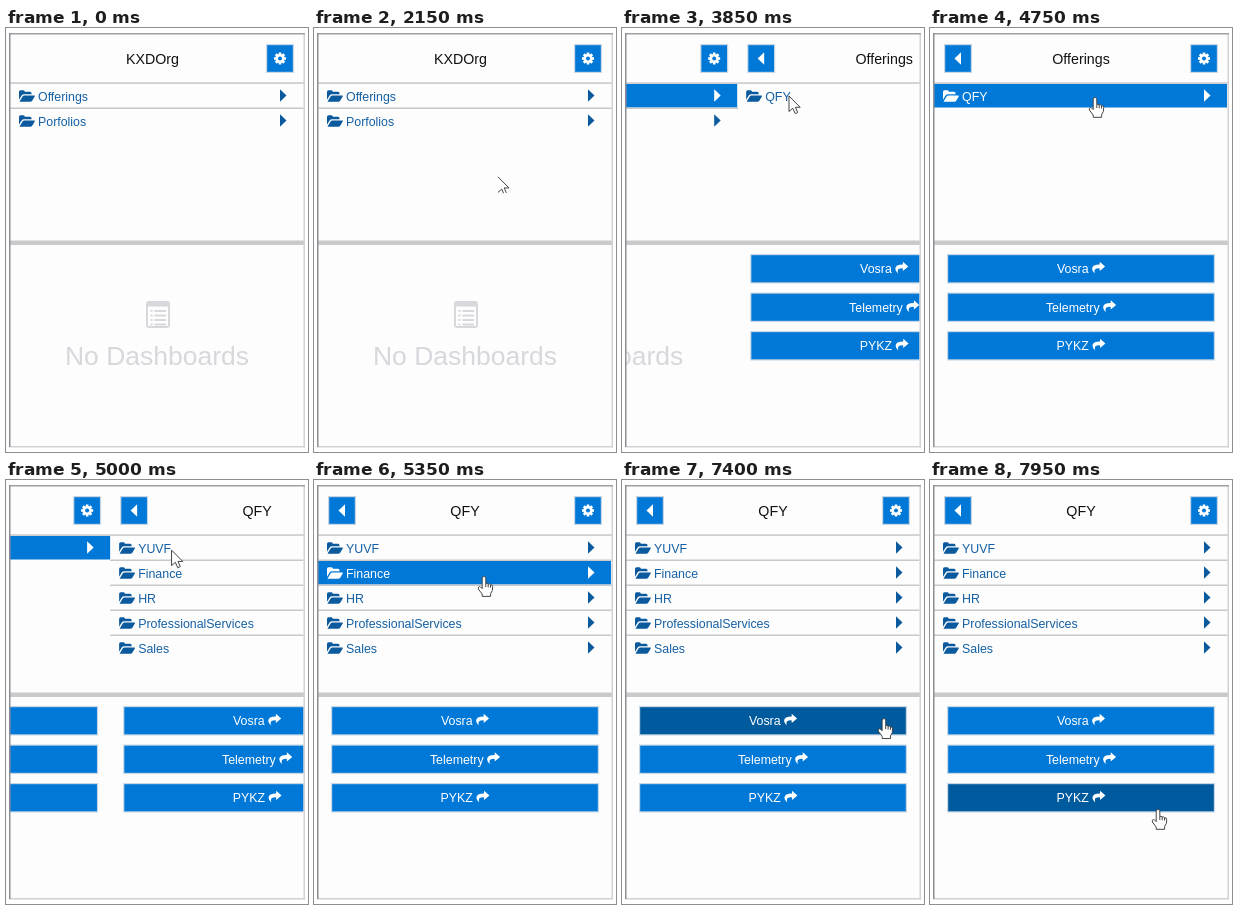
Write an HTML page with a canvas that moves like this. It is 302 px wide and 424 px high and loops after 8 s.

```html
<!DOCTYPE html>
<html lang="en">
<head>
<meta charset="utf-8">
<title>Dashboard navigator</title>
<style>
html, body { margin: 0; width: 100%; height: 100%; overflow: hidden; background: #fff; }
canvas { display: block; width: 302px; height: 424px; }
</style>
</head>
<body>
<canvas id="stage"></canvas>
<script>
const W = 302, H = 424, LOOP = 8000, PAGE_W = 293;
const BLUE = '#0078d7', DARK = '#005a9e', LINK = '#1560a3', RULE = '#c8c8ca', GHOST = '#d7d8dc';
const FONT = '"Liberation Sans", Arial, sans-serif';

const canvas = document.getElementById('stage');
const ctx = canvas.getContext('2d');
const dpr = window.devicePixelRatio || 1;
canvas.width = W * dpr;
canvas.height = H * dpr;

const tools = ['Vosra', 'Telemetry', 'PYKZ'];
const pages = [
  { title: 'KXDOrg', rows: ['Offerings', 'Porfolios'], tools: [] },
  { title: 'Offerings', rows: ['QFY'], tools, back: true },
  { title: 'QFY', rows: ['YUVF', 'Finance', 'HR', 'ProfessionalServices', 'Sales'], tools, back: true }
];

const slides = [3620, 4760];
const SLIDE_MS = 400;

// time, x, y of the pointer tip
const path = [
  [1750, 290, 300], [2150, 184, 149], [2550, 176, 112], [2700, 171, 92], [2900, 167, 69],
  [3850, 167, 68], [4300, 165, 69], [4750, 165, 69], [5200, 166, 71], [5320, 170, 96],
  [5700, 170, 97], [5950, 168, 114], [6300, 161, 184], [6520, 215, 290], [6800, 258, 216],
  [7100, 290, 236], [7250, 304, 238], [7400, 262, 238], [7800, 228, 329], [8000, 228, 329]
];

const folder = new Path2D('M0 9.5V1.5Q0 0 1.5 0H4.5Q5.8 0 5.8 1.5H11Q12.5 1.5 12.5 3V4H5Q3.5 4 2.6 5.3Z' +
  'M.6 11.3L3.6 6.2Q4.2 5.1 5.4 5.1H15.2Q16.4 5.1 15.7 6.3L13.2 10.4Q12.4 11.5 11.2 11.5H1Q.4 11.5 .6 11.3Z');
const share = new Path2D('M7.6 0L13 4.6L7.6 9.2V6.6Q2.4 6.3 2.4 9.4Q2.4 10.6 3 12Q0 9.6 0 7Q0 2.6 7.6 2.6Z');
const arrow = new Path2D('M0 0V15.5L3.8 12.2L6.2 17.6L8.7 16.5L6.4 11.3H11.2Z');
const faintArrow = new Path2D('M0 0L11 11H6.2L8.4 16M0 15.5L3.8 12.2L5.6 16.4');
const hand = new Path2D('M-1.8 1.5Q0 -1 1.8 1.5V7.5Q3.2 6.6 4.2 8Q5.6 7.3 6.5 8.8Q8.7 8.3 8.7 10.5' +
  'Q9 15 6.6 17.5V20.3H-1.8V18L-5.6 13Q-6 9.8 -3.6 10.8L-1.8 12.6Z');
const fingers = new Path2D('M1.8 7.5V11M4.2 8V11.3M6.5 8.8V11.6');

function text(str, x, y, size, color, align = 'left') {
  ctx.font = `${size}px ${FONT}`;
  ctx.textAlign = align;
  ctx.fillStyle = color;
  ctx.fillText(str, x, y);
}

function rect(x, y, w, h, color) {
  ctx.fillStyle = color;
  ctx.fillRect(x, y, w, h);
}

function fillAt(shape, x, y, color) {
  ctx.save();
  ctx.translate(x, y);
  ctx.fillStyle = color;
  ctx.fill(shape);
  ctx.restore();
}

function triangle(x, y, dx, half, color) {
  ctx.fillStyle = color;
  ctx.beginPath();
  ctx.moveTo(x, y - half);
  ctx.lineTo(x + dx, y);
  ctx.lineTo(x, y + half);
  ctx.fill();
}

function disc(x, y, r, color) {
  ctx.fillStyle = color;
  ctx.beginPath();
  ctx.arc(x, y, r, 0, Math.PI * 2);
  ctx.fill();
}

function button(x, y, w, h, color = BLUE) {
  rect(x, y, w, h, '#c6d6e4');
  rect(x + 1.2, y + 1.2, w - 2.4, h - 2.4, color);
}

function gear(x, y) {
  ctx.save();
  ctx.translate(x, y);
  for (let i = 0; i < 4; i++) {
    rect(-1.3, -6, 2.6, 12, '#fff');
    ctx.rotate(Math.PI / 4);
  }
  disc(0, 0, 4.6, '#fff');
  disc(0, 0, 2, BLUE);
  ctx.restore();
}

function emptyNote() {
  ctx.strokeStyle = GHOST;
  ctx.lineWidth = 2;
  ctx.beginPath();
  ctx.roundRect(141, 274, 22, 25, 2);
  ctx.stroke();
  rect(141, 274, 22, 4.5, GHOST);
  for (let y = 282; y < 296; y += 4.5) {
    rect(144.5, y, 2, 2, GHOST);
    rect(148.5, y, 11.5, 2, GHOST);
  }
  text('No Dashboards', 151, 337, 26.5, GHOST, 'center');
}

function drawRow(label, i, lit) {
  const y = 56 + i * 25;
  const color = lit ? '#fff' : LINK;
  if (i) rect(4, y - 1.5, PAGE_W + 1, 1.5, RULE);
  if (lit) rect(4, y, PAGE_W, 23.5, BLUE);
  fillAt(folder, 13, y + 6.3, lit ? '#fff' : '#0b5a9e');
  text(label, 32, y + 16.7, 12.4, color);
  triangle(274, y + 11.5, 6.5, 6.2, lit ? '#fff' : '#0b5a9e');
}

function drawTool(label, i, lit) {
  const y = 226 + i * 38.5;
  button(17, y, 268, 29.5, lit ? DARK : BLUE);
  ctx.font = `12.4px ${FONT}`;
  const w = ctx.measureText(label).width;
  const x = 151 - (w + 16.5) / 2;
  text(label, x, y + 19, 12.4, '#fff');
  fillAt(share, x + w + 3.5, y + 7.8, '#fff');
}

function drawPage(page, dx, hover) {
  ctx.save();
  ctx.translate(dx, 0);
  text(page.title, page.back ? 151 : 146.5, 35.7, 14.25, '#111', 'center');
  button(260, 16, 28, 29);
  gear(274, 30.5);
  if (page.back) {
    button(14, 16, 28, 29);
    triangle(31, 30.5, -6.5, 6.2, '#fff');
  }
  page.rows.forEach((label, i) => drawRow(label, i, hover.row === i));
  page.tools.forEach((label, i) => drawTool(label, i, hover.tool === i));
  if (!page.tools.length) emptyNote();
  ctx.restore();
}

function pointer(t) {
  if (t < path[0][0] || (t > 7250 && t < 7400)) return null;
  const i = Math.max(1, path.findIndex(k => k[0] >= t));
  const [t0, x0, y0] = path[i - 1], [t1, x1, y1] = path[i];
  const p = (t - t0) / (t1 - t0);
  return { x: x0 + (x1 - x0) * p, y: y0 + (y1 - y0) * p };
}

function hitTest(page, at) {
  const hit = {};
  if (!at) return hit;
  const row = Math.floor((at.y - 55) / 25);
  if (at.x > 4 && at.x < 297 && row >= 0 && row < page.rows.length) hit.row = row;
  if (at.x > 17 && at.x < 285) {
    const tool = page.tools.findIndex((_, i) => at.y >= 226 + i * 38.5 && at.y < 255.5 + i * 38.5);
    if (tool >= 0) hit.tool = tool;
  }
  return hit;
}

function drawPointer(at, over, sliding) {
  ctx.save();
  ctx.translate(at.x, at.y);
  ctx.lineWidth = 1;
  ctx.lineJoin = 'round';
  ctx.strokeStyle = '#444';
  ctx.fillStyle = '#fff';
  if (over) {
    ctx.fill(hand);
    ctx.stroke(hand);
    ctx.stroke(fingers);
  } else if (sliding) {
    ctx.fill(arrow);
    ctx.stroke(arrow);
  } else {
    ctx.fill(arrow);
    ctx.stroke(faintArrow);
  }
  ctx.restore();
}

function easeInOut(p) {
  return (1 - Math.cos(Math.PI * p)) / 2;
}

function draw(t) {
  ctx.setTransform(dpr, 0, 0, dpr, 0, 0);
  rect(0, 0, W, H, '#fff');
  rect(4, 6, 294, 412, '#fdfdfe');

  const done = slides.filter(s => t >= s + SLIDE_MS).length;
  const p = (t - slides[done]) / SLIDE_MS;
  const sliding = p >= 0 && p < 1;
  const at = pointer(t);
  const hover = sliding ? { row: 0 } : hitTest(pages[done], at);

  ctx.save();
  ctx.beginPath();
  ctx.rect(4, 6, 293.5, 412);
  ctx.clip();
  const shift = sliding ? easeInOut(p) * PAGE_W : 0;
  drawPage(pages[done], -shift, hover);
  if (sliding) drawPage(pages[done + 1], PAGE_W - shift, {});
  ctx.restore();

  rect(4, 54.3, 294, 1.5, RULE);
  rect(4, 212.5, 294, 4.5, '#cacacc');
  rect(297.5, 5, 1.5, 414.5, '#d2d2d6');
  rect(3, 418, 296, 1.5, '#d2d2d6');
  rect(3, 5, 296, 1.5, '#a0a0a6');
  rect(3, 5, 1.5, 414, '#8e8e94');

  if (at) drawPointer(at, !sliding && Object.keys(hover).length > 0, sliding);
}

const start = performance.now();
function tick() {
  draw((performance.now() - start) % LOOP);
  requestAnimationFrame(tick);
}
tick();
</script>
</body>
</html>
```
